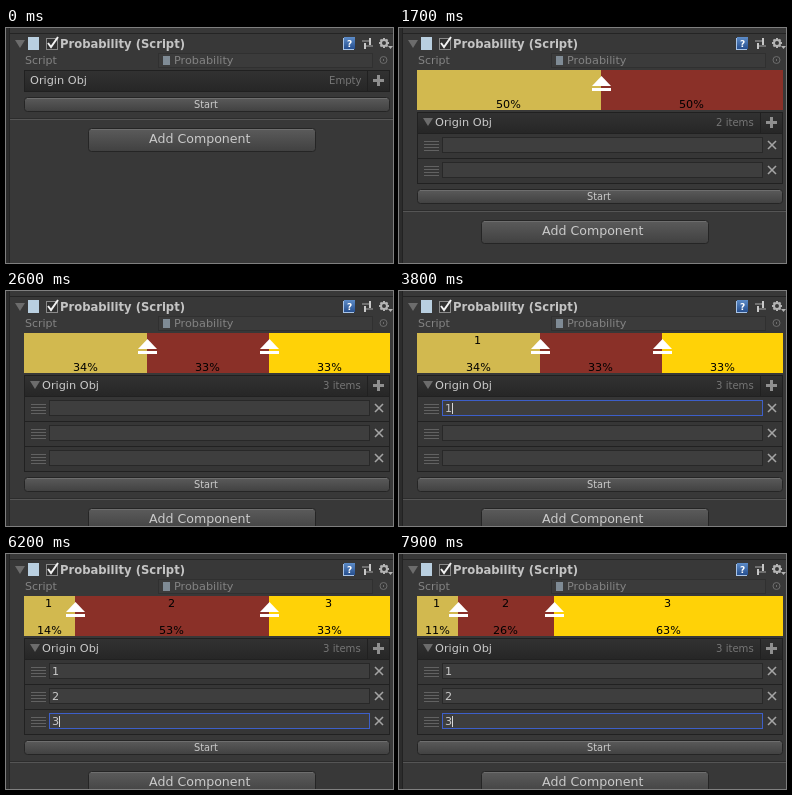
Recreate the animation shown at these times as an HTML page with a canvas. Size 387 px wide and 235 px high, loop 8000 ms.

```html
<!DOCTYPE html>
<html lang="en">
<head>
<meta charset="utf-8">
<title>Probability inspector</title>
<style>
html, body { margin: 0; width: 100%; height: 100%; overflow: hidden; background: #383838; }
canvas { display: block; }
</style>
</head>
<body>
<canvas id="stage" width="387" height="235"></canvas>
<script>
const ctx = document.getElementById('stage').getContext('2d');
const LOOP = 8000, LEFT = 18, RIGHT = 384, WIDTH = RIGHT - LEFT;
const COLORS = ['#d2b94f', '#8a3028', '#ffd207'];

// Each track is a list of [start time, value]; values are held.
const itemCount = [[0, 0], [700, 1], [1700, 2], [2500, 3]];
const plusHover = [[0, 0], [500, 1], [700, 0], [1200, 1], [1600, 0], [2000, 1], [2200, 0], [2400, 1], [2500, 0]];
const focusRow = [[0, -1], [3100, 0], [4700, 1], [5200, 2]];
const typedAt = [3800, 4900, 5400];
const firstSplit = [[0, 141], [6000, 128], [6100, 97], [6200, 69], [6300, 55], [6500, 57], [6600, 59]];
const secondSplit = [[0, 263], [7300, 267], [7400, 243], [7500, 205], [7600, 174], [7700, 159], [7900, 155]];

const valueAt = (track, t) => track.filter(([start]) => start <= t).pop()[1];

function rect(x, y, w, h, fill) {
  ctx.fillStyle = fill;
  ctx.fillRect(x, y, w, h);
}

function box(x, y, w, h, fill, border) {
  rect(x, y, w, h, border);
  rect(x + 1, y + 1, w - 2, h - 2, fill);
}

function poly(points, fill) {
  ctx.fillStyle = fill;
  ctx.beginPath();
  points.forEach(([x, y]) => ctx.lineTo(x, y));
  ctx.fill();
}

function line(points, color, width) {
  ctx.strokeStyle = color;
  ctx.lineWidth = width;
  ctx.beginPath();
  points.forEach(([x, y]) => ctx.lineTo(x, y));
  ctx.stroke();
}

function ring(x, y, r, color, width) {
  ctx.strokeStyle = color;
  ctx.lineWidth = width;
  ctx.beginPath();
  ctx.arc(x, y, r, 0, 7);
  ctx.stroke();
}

function text(str, x, y, size, color, weight = '') {
  ctx.font = `${weight} ${size}px "DejaVu Sans", sans-serif`;
  ctx.fillStyle = color;
  ctx.fillText(str, x, y);
}

// Centred text starts on a whole pixel.
function centered(str, mid, y, size, color, weight = '') {
  ctx.font = `${weight} ${size}px "DejaVu Sans", sans-serif`;
  text(str, Math.floor(mid - ctx.measureText(str).width / 2), y, size, color, weight);
}

function shade(y, h, top, bottom) {
  const g = ctx.createLinearGradient(0, y, 0, y + h);
  g.addColorStop(0, top);
  g.addColorStop(1, bottom);
  return g;
}

function button(x, y, w, h, label, mid, baseline, size) {
  ctx.beginPath();
  ctx.roundRect(x + .5, y + .5, w - 1, h - 1, 3);
  ctx.fillStyle = shade(y, h, '#5c5c5c', '#404040');
  ctx.fill();
  ctx.strokeStyle = '#252525';
  ctx.lineWidth = 1;
  ctx.stroke();
  rect(x + 3, y + 1, w - 6, 1, '#6e6e6e');
  centered(label, mid, baseline, size, '#cacaca');
}

const foldout = (x, y, color) => poly([[x, y], [x + 10, y], [x + 5, y + 8]], color);

function drawHeader() {
  rect(0, 0, 387, 235, '#383838');
  rect(0, 0, 3, 235, '#2c2c2c');
  rect(3, 0, 1, 235, '#222');
  rect(4, 5, 383, 1, '#242424');
  foldout(9, 12, '#6c6c6c');
  rect(22, 9, 11, 13, '#b9cfe0');

  box(40, 10, 12, 12, '#303030', '#8a8a8a');
  line([[42, 15], [45, 19], [52, 9]], '#f2f2f2', 2);
  text('Probability (Script)', 54, 20, 11.6, '#c4c4c4', 'bold');

  rect(337, 10, 11, 12, '#a9c4e6');
  rect(338, 9, 11, 12, shade(9, 12, '#5d8cc8', '#264f8f'));
  centered('?', 344, 19, 9, '#fff', 'bold');
  line([[356, 13], [363, 13]], '#a8a8a8', 1);
  line([[359, 18], [367, 18]], '#a8a8a8', 1);
  line([[364, 10], [364, 17]], '#c8c8c8', 2);
  line([[359, 15], [359, 21]], '#c8c8c8', 2);

  for (let i = 0; i < 8; i++) {
    const a = i * Math.PI / 4, c = Math.cos(a), s = Math.sin(a);
    line([[378 + 3 * c, 15 + 3 * s], [378 + 5 * c, 15 + 5 * s]], '#b4b4b4', 2);
  }
  ring(378, 15, 3, '#b4b4b4', 2);
  poly([[382, 18], [387, 18], [384.5, 21]], '#b4b4b4');

  text('Script', 19, 36, 11, '#838383');
  box(152, 25, 215, 15, '#3b3b3b', '#303030');
  rect(157, 28, 7, 9, '#7f8b95');
  text('Probability', 168, 36, 11.25, '#838383');
  ring(377.5, 32, 3.5, '#6c6c6c', 1);
  rect(377, 31, 1, 2, '#6c6c6c');
}

function drawBar(count, t) {
  const splits = count < 3 ? [LEFT + WIDTH / 2 + 1] : [valueAt(firstSplit, t), valueAt(secondSplit, t)];
  const edges = [LEFT, ...splits.slice(0, count - 1), RIGHT];
  for (let i = 0; i < count; i++) {
    const x = edges[i], w = edges[i + 1] - x, mid = x + w / 2;
    rect(x, 42, w, 40, COLORS[i]);
    if (t >= typedAt[i]) centered(i + 1, mid, 53, 11.2, '#000');
    centered(Math.round(w / WIDTH * 100) + '%', mid, 80, 11.2, '#000');
  }
  for (const x of edges.slice(1, -1)) {
    poly([[x + .5, 48], [x + 10, 58], [x - 9, 58]], '#fff');
    rect(x - 9, 60, 19, 3, '#fff');
  }
}

function drawListHeader(y, count, hover) {
  box(LEFT, y, WIDTH, 22, shade(y, 22, '#323232', '#262626'), '#202020');
  rect(361, y + 1, 1, 20, '#202020');
  if (count) foldout(24, y + 6, '#6c6c6c');
  text('Origin Obj', count ? 36 : 24, y + 14, 11.3, '#cacaca');
  text(count ? count + ' items' : 'Empty', count ? 317 : 323, y + 14, 10.1, '#757575');
  const color = hover ? '#f6f6f6' : '#8f8f8f';
  rect(367, y + 9, 11, 3, color);
  rect(371, y + 5, 3, 11, color);
}

function drawRow(i, t) {
  const y = 105 + i * 25, focused = valueAt(focusRow, t) === i, typed = t >= typedAt[i];
  box(LEFT, y, WIDTH, 26, '#363636', '#212121');
  for (let k = 0; k < 4; k++) rect(25, y + 8 + k * 3, 15, 1, '#626262');
  box(43, y + 4, 321, 16, '#3e3e3e', focused ? '#3d5fc9' : '#282828');
  if (typed) text(i + 1, 46, y + 16, 11.2, '#cacaca');
  if (focused) rect(typed ? 53 : 46, y + 7, 1, 11, '#d8d8d8');
  line([[369, y + 8], [377, y + 16]], '#a4a4a4', 1.6);
  line([[377, y + 8], [369, y + 16]], '#a4a4a4', 1.6);
}

function draw(t) {
  const count = valueAt(itemCount, t);
  const listY = count ? 84 : 42;
  drawHeader();
  if (count) drawBar(count, t);
  drawListHeader(listY, count, valueAt(plusHover, t));
  for (let i = 0; i < count; i++) drawRow(i, t);

  const y = listY + 27 + count * 25;
  button(LEFT, y, WIDTH, 15, 'Start', 200, y + 11, 9.8);
  rect(4, y + 21, 383, 1, '#2c2c2c');
  rect(4, y + 22, 383, 1, '#555');
  button(82, y + 31, 228, 24, 'Add Component', 194.5, y + 46, 12.6);
}

function tick(now) {
  draw(now % LOOP);
  requestAnimationFrame(tick);
}
requestAnimationFrame(tick);
</script>
</body>
</html>
```
